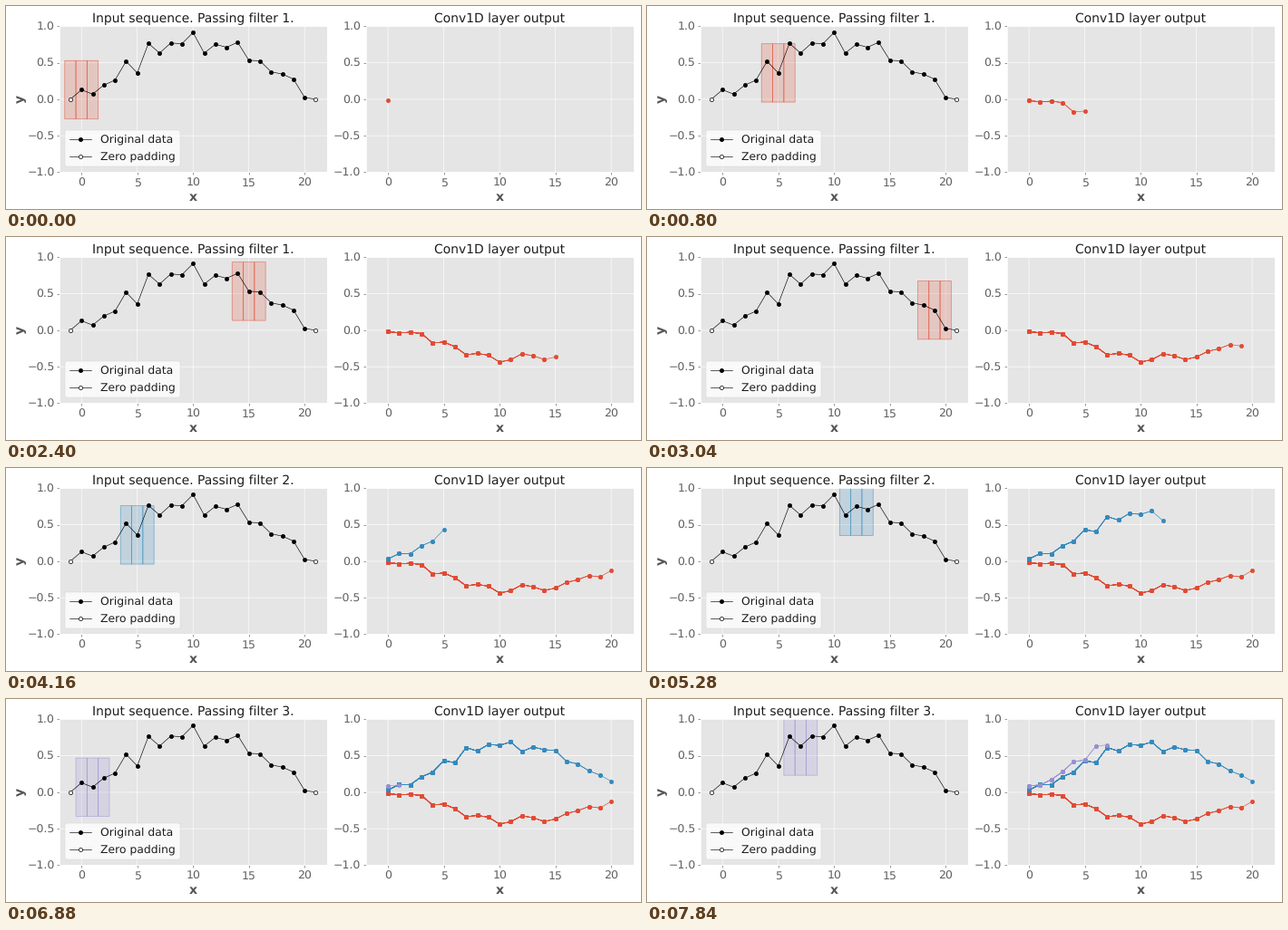
Animation, 700 px wide and 224 px high, one loop 8000 ms. Source, as a matplotlib script:

```python
import numpy as np
import matplotlib.pyplot as plt
from matplotlib.animation import FuncAnimation
from matplotlib.colors import to_rgba
from matplotlib.patches import Rectangle

W, H, DPI = 700, 224, 56
FRAMES, INTERVAL = 50, 160
COLORS = ["#E24A33", "#348ABD", "#988ED5"]
KERNELS = [(-0.43, -0.26, 0.205), (0.53, 0.18, 0.12), (0.18, 0.60, 0.17)]
AMP = 0.8

plt.style.use("ggplot")
plt.rcParams.update({
    "font.family": "DejaVu Sans", "text.hinting": "none",
    "text.color": "#1c1c1c", "xtick.color": "#606060", "ytick.color": "#606060",
    "lines.linewidth": 0.8, "lines.marker": "o", "lines.markersize": 5.4,
    "lines.markeredgewidth": 0.9,
})

# Noisy sine wave and its convolution with each filter
n = 21
x = np.arange(n)
noise = np.random.RandomState(1).randn(n)
data = AMP * (np.sin(0.15 * x) + 0.1 * noise)
padded = np.pad(data, 1)
outputs = [np.correlate(padded, k, mode="valid") for k in KERNELS]

fig = plt.figure(figsize=(W / DPI, H / DPI), dpi=DPI, facecolor="white")


def make_axes(left, title):
    top, bottom, width = 22.4, 183.45, 295.2
    ax = fig.add_axes([left / W, 1 - bottom / H, width / W, (bottom - top) / H])
    ax.set(xlim=(-2, 22), ylim=(-1, 1), xticks=range(0, n, 5),
           yticks=np.linspace(-1, 1, 5))
    ax.tick_params(axis="x", labelsize=16, pad=4)
    ax.tick_params(axis="y", labelsize=16, pad=3)
    for line in ax.get_xgridlines() + ax.get_ygridlines():
        line.set_snap(False)
    ax.set_xlabel("x", fontsize=18, fontweight="bold")
    return ax, ax.set_title(title, fontsize=17.85)


ax_in, title = make_axes(58.6, "")
ax_out, _ = make_axes(396.5, "Conv1D layer output")
ax_in.set_ylabel("y", fontsize=18, fontweight="bold", labelpad=1)

# Input sequence with its zero-padded ends
ax_in.plot(np.arange(-1, n + 1), padded, color="black", marker="")
solid, = ax_in.plot(x, data, color="black", ls="")
ax_in.plot([-1, n], [0, 0], color="black", ls="", mfc="white")
solid, = ax_in.plot([], [], color="black")
hollow, = ax_in.plot([], [], color="black", mfc="white")
ax_in.legend([solid, hollow], ["Original data", "Zero padding"],
             loc="lower left", fontsize=15.85, labelspacing=0.6,
             facecolor="white", framealpha=0.8)

cells = [ax_in.add_patch(Rectangle((0, 0), 1, AMP, lw=1, snap=False))
         for _ in range(3)]

# Every step plots the output so far on top of the earlier plots
steps = []
for k in range(FRAMES):
    f, i = divmod(k, n)
    steps += ax_out.plot(x[:i + 1], outputs[f][:i + 1], color=COLORS[f])


def update(k):
    f, i = divmod(k, n)
    title.set_text(f"Input sequence. Passing filter {f + 1}.")
    for j, cell in enumerate(cells):
        cell.set_xy((i - 1.5 + j, data[i] - AMP / 2))
        cell.set_facecolor(to_rgba(COLORS[f], 0.2))
        cell.set_edgecolor(to_rgba(COLORS[f], 0.6))
    for j, line in enumerate(steps):
        line.set_visible(j <= k)
    return [title, *cells, *steps]


anim = FuncAnimation(fig, update, frames=FRAMES, interval=INTERVAL, repeat=True)
plt.show()
```
